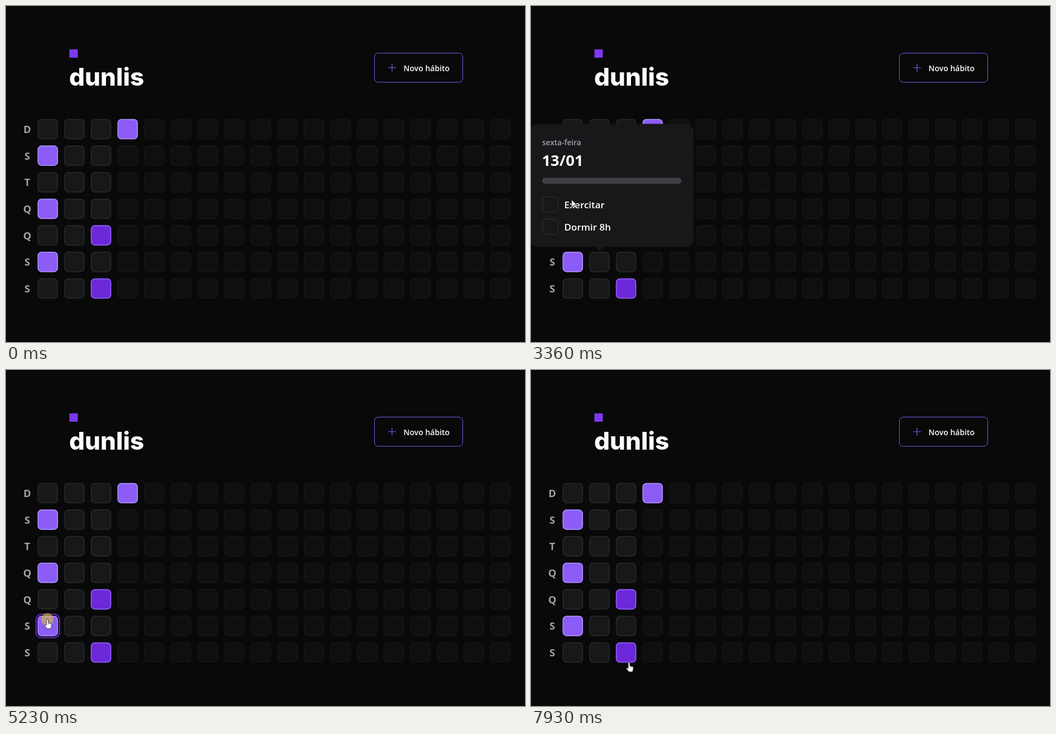
Write an HTML page that moves like this. It is 929 px wide and 603 px high and loops after 8000 ms.

```html
<!DOCTYPE html>
<html lang="pt-BR">
<head>
<meta charset="utf-8">
<style>
  html, body { margin: 0; width: 100%; height: 100%; overflow: hidden; background: #09090a; }
  svg { display: block; width: 929px; height: 603px; }
  text { font-family: "Open Sans", "Noto Sans", sans-serif; font-weight: 600; fill: #fff; }
  .title { font: 800 44px Inter, sans-serif; }
  .day { font-size: 18.3px; font-weight: 700; fill: #a1a1aa; text-anchor: middle; }
  .weekday { font-size: 13.7px; fill: #a1a1aa; }
  .date { font: 900 27.5px "Noto Sans", "Open Sans", sans-serif; }
  .task { font-size: 17px; }
</style>
</head>
<body>
<svg id="stage" viewBox="0 0 929 603"></svg>
<script>
const LOOP = 8000, PITCH = 47.66, SIZE = 36.65, LEFT = 74.8, TOP = 221;
const BOTTOM = 432.4, WIDTH = 293.2;
const stage = document.getElementById('stage');

function add(parent, tag, attrs, text) {
  const el = document.createElementNS('http://www.w3.org/2000/svg', tag);
  for (const key in attrs) el.setAttribute(key, attrs[key]);
  if (text) el.textContent = text;
  parent.appendChild(el);
  return el;
}

// Rounded box whose border lies inside its size, as in CSS
function box(parent, x, y, size, fill, stroke, opacity = 1) {
  const w = 1.83;
  return add(parent, 'rect', {
    x: x + w / 2, y: y + w / 2, width: size - w, height: size - w,
    rx: 6.4, fill, stroke, 'stroke-width': w, opacity
  });
}

const show = (el, on) => el.setAttribute('visibility', on ? 'visible' : 'hidden');
const moveTo = (el, x, y) => el.setAttribute('transform', `translate(${x} ${y})`);
const within = (t, [from, to]) => t >= from && t < to;

// Header
add(stage, 'rect', { x: 113.5, y: 77.8, width: 15, height: 15, fill: '#7c3aed' });
add(stage, 'text', { x: 113, y: 143, class: 'title' }, 'dunlis');
add(stage, 'rect', {
  x: 659.5, y: 84.5, width: 158, height: 52.4, rx: 7, fill: 'none', stroke: '#8b5cf6', 'stroke-width': 0.95
});
add(stage, 'path', { d: 'M684 110.7h14M691 103.7v14', stroke: '#8b5cf6', 'stroke-width': 1.15 });
add(stage, 'text', { x: 711.5, y: 116.7, 'font-size': 14 }, 'Novo hábito');

// Calendar
const FULL = ['#8b5cf6', '#a78bfa'], HALF = ['#6d28d9', '#8b5cf6'], EMPTY = ['#18181b', '#27272a'];
const marked = {
  '3,0': FULL, '0,1': FULL, '0,3': FULL, '0,5': FULL, '2,4': HALF, '2,6': HALF
};
const colX = col => LEFT + col * PITCH;
const rowY = row => TOP + row * PITCH;

[...'DSTQQSS'].forEach((letter, row) => {
  add(stage, 'text', { x: 38, y: rowY(row) + 7, class: 'day' }, letter);
  for (let col = 0; col < 18; col++) {
    const [fill, stroke] = marked[[col, row]] || EMPTY;
    const past = col < 3 || (col === 3 && row === 0);
    box(stage, colX(col) - SIZE / 2, rowY(row) - SIZE / 2, SIZE, fill, stroke, past ? 1 : 0.4);
  }
});

const ring = add(stage, 'rect', {
  x: -21.1, y: -21.1, width: 42.2, height: 42.2, rx: 10,
  fill: 'none', stroke: '#6d28d9', 'stroke-width': 1.83
});

// Popups open without tasks and grow upward once these are loaded
const TASKS = ['Exercitar', 'Dormir 8h'];
const popups = [
  { open: 1730, ready: 2000, close: 4740, col: 1, date: '13/01', count: 2, bar: '#3f3f46' },
  { open: 4880, ready: 5020, close: 5200, col: 2, date: '20/01', count: 2, bar: '#3f3f46' },
  { open: 5300, ready: 5430, close: 7320, col: 0, date: '06/01', count: 1, bar: '#7c3aed' }
];

function buildCard(popup, count) {
  const card = add(stage, 'g', {});
  const height = count ? 140.2 + 40.4 * count : 151.2;
  const x = Math.max(-2.2, colX(popup.col) - WIDTH / 2), y = BOTTOM - height;
  const inner = x + 22.1, tip = colX(popup.col);
  add(card, 'rect', { x, y, width: WIDTH, height, rx: 14.6, fill: '#18181b' });
  add(card, 'path', { d: `M${tip - 7.4} ${BOTTOM - 0.3}h14.8l-7.4 7.4z`, fill: '#18181b' });
  add(card, 'text', { x: inner, y: y + 38.6, class: 'weekday' }, 'sexta-feira');
  add(card, 'text', { x: inner - 0.5, y: y + 75.4, class: 'date' }, popup.date);
  add(card, 'rect', { x: inner, y: y + 96.8, width: 249.2, height: 11, rx: 5.5, fill: popup.bar });
  for (let i = 0; i < count; i++) {
    const top = y + 129.8 + i * 40.4;
    box(card, inner, top, 29.3, ...EMPTY);
    add(card, 'text', { x: inner + 39.7, y: top + 21.3, class: 'task' }, TASKS[i]);
  }
  return card;
}

for (const popup of popups) {
  popup.loading = buildCard(popup, 0);
  popup.loaded = buildCard(popup, popup.count);
}

// Pointer
const halo = add(stage, 'circle', { r: 11, fill: '#dcbe3c', opacity: 0.62 });
const arrow = add(stage, 'path', {
  d: 'M0 0V12.4L2.9 9.8L4.9 14.1L7 13.2L5.1 9H9Z',
  fill: '#fff', stroke: '#000', 'stroke-width': 0.7
});
const hand = add(stage, 'g', {});
add(hand, 'path', {
  d: 'M-1.5 1.2a1.5 1.5 0 0 1 3 0V5.8l4.4 1q2.2.6 2 2.6l-.8 4.4-1.1 3H-.4L-4.6 11.2q-.9-1.7.6-2l2.5 1.5Z',
  fill: '#fff', stroke: '#000', 'stroke-width': 0.7, 'stroke-linejoin': 'round'
});
add(hand, 'path', { d: 'M1.7 6v3M3.8 6.6v2.6M5.8 7.2v2.2', stroke: '#333', 'stroke-width': 0.6 });

const path = [
  [570, 80, 540], [770, 93, 528], [980, 115, 505], [1200, 115, 505], [1600, 121, 452.5],
  [2200, 121, 452.5], [2340, 123, 470], [2480, 122, 490], [2610, 119.5, 487], [2760, 105, 450],
  [2900, 80, 405], [3030, 66, 378], [3100, 66, 376], [3300, 74, 346], [3500, 70, 352],
  [3700, 62, 388], [3860, 72, 348], [3930, 71, 341], [4000, 85, 380], [4140, 124.5, 447],
  [4270, 158, 476], [4400, 168, 465], [4540, 166, 455], [4880, 166, 455], [5020, 138, 453],
  [5160, 78, 449], [5230, 74, 447.5], [5830, 74, 447.5], [6090, 87, 393], [6350, 87, 393],
  [6385, 80, 388], [6420, 90, 388], [6560, 90, 388], [6970, 168.5, 426], [7250, 194, 446.5],
  [7460, 194, 446.5], [7590, 195, 470], [7660, 194, 495], [7790, 189, 521], [7860, 181, 528],
  [7930, 175.5, 525]
];
const focus = [[1530, 1730, 1], [4740, 4880, 2], [5200, 5300, 0]];
const presses = [[1530, 1650], [4740, 4880], [5200, 5300], [7300, 7390]];

function pointerAt(t) {
  const next = path.findIndex(key => key[0] > t);
  if (next < 1) return path[next < 0 ? path.length - 1 : 0].slice(1);
  const [t0, x0, y0] = path[next - 1], [t1, x1, y1] = path[next];
  const k = (t - t0) / (t1 - t0);
  return [x0 + (x1 - x0) * k, y0 + (y1 - y0) * k];
}

function overCell(x, y) {
  const col = Math.round((x - LEFT) / PITCH), row = Math.round((y - TOP) / PITCH);
  return col >= 0 && col < 3 && row >= 0 && row < 7 &&
    Math.abs(x - colX(col)) < SIZE / 2 && Math.abs(y - rowY(row)) < SIZE / 2;
}

function draw() {
  const t = performance.now() % LOOP;
  let covered = false;
  for (const { open, ready, close, loading, loaded } of popups) {
    const full = within(t, [ready, close]);
    show(loading, within(t, [open, ready]));
    show(loaded, full);
    covered = covered || full;
  }

  const focused = focus.find(span => within(t, span));
  show(ring, focused);
  if (focused) moveTo(ring, colX(focused[2]), rowY(5));

  const [x, y] = pointerAt(t);
  const visible = t >= path[0][0];
  const pointing = !covered && overCell(x, y);
  show(arrow, visible && !pointing);
  show(hand, visible && pointing);
  show(halo, presses.some(span => within(t, span)));
  moveTo(arrow, x, y);
  moveTo(hand, x, y);
  moveTo(halo, x, y);
  requestAnimationFrame(draw);
}
draw();
</script>
</body>
</html>
```
